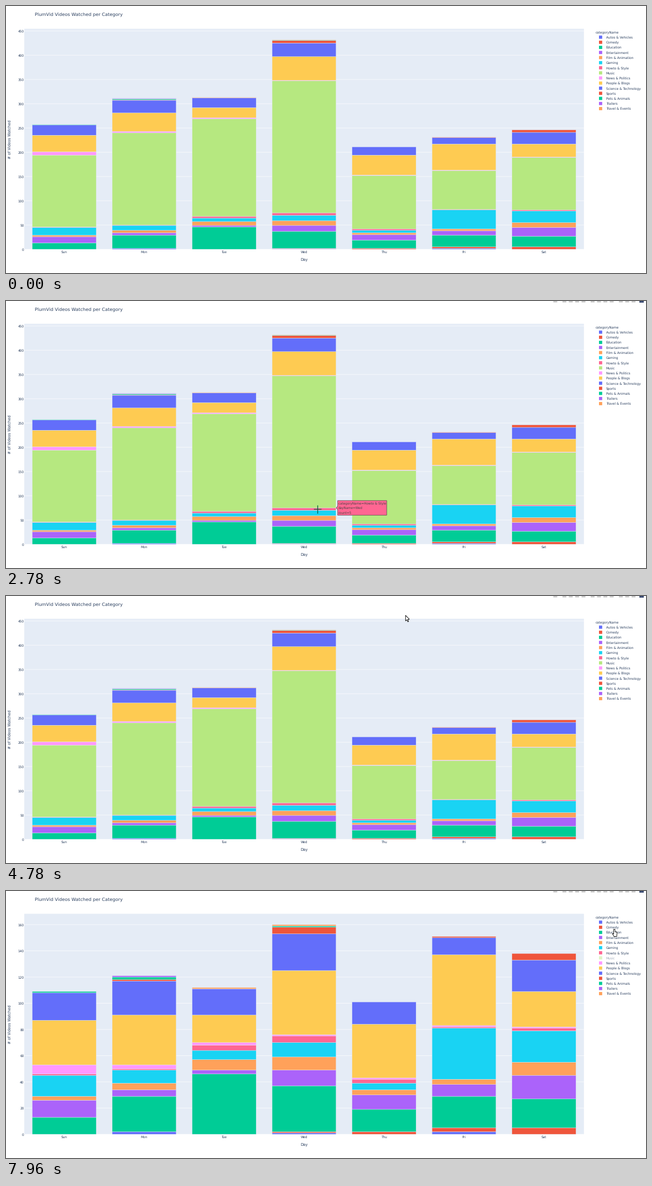
Animation, 1157 px wide and 484 px high, one loop 8 s. Source, as a matplotlib script:

```python
from math import cos

import numpy as np
import matplotlib.pyplot as plt
from matplotlib.animation import FuncAnimation
from matplotlib.collections import PatchCollection
from matplotlib.colors import to_rgb
from matplotlib.patches import Polygon, Rectangle

W, H, DPI = 1157, 484, 64
LOOP_MS, STEP_MS = 8000, 40
CURSOR_MS, TOGGLE_MS = 300, 6340
LEFT, TOP, RIGHT, BOTTOM = 33, 41.3, 1044.8, 441
INK, PLOT_BG = "#2a3f5f", "#e5ecf6"

plt.rcParams["font.family"] = "DejaVu Sans"
plt.rcParams["text.hinting"] = "none"

DAYS = ["Sun", "Mon", "Tue", "Wed", "Thu", "Fri", "Sat"]
CATEGORIES = [
    "Autos & Vehicles", "Comedy", "Education", "Entertainment",
    "Film & Animation", "Gaming", "Howto & Style", "Music",
    "News & Politics", "People & Blogs", "Science & Technology",
    "Sports", "Pets & Animals", "Trailers", "Travel & Events",
]
PALETTE = ["#636efa", "#ef553b", "#00cc96", "#ab63fa", "#ffa15a",
           "#19d3f3", "#ff6692", "#b6e880", "#ff97ff", "#fecb52"]
MUSIC = CATEGORIES.index("Music")
MUSIC_COUNTS = [148, 190, 201, 272, 110, 80, 108]

# Where the large categories end in each day's stack, music left out
LEVELS = {
    "Education": [13, 29, 46, 37, 19, 29, 27],
    "Entertainment": [26, 34, 49, 49, 30, 38, 45],
    "Film & Animation": [29, 39, 57, 59, 34, 42, 55],
    "Gaming": [45, 49, 64, 70, 39, 81, 79],
    "People & Blogs": [87, 91, 91, 125, 84, 137, 109],
    "Science & Technology": [108, 117, 111, 153, 101, 150, 133],
}
# Thin slices, as rules of the day number
SLICES = {
    "Autos & Vehicles": lambda d: d % 2 * (2 - d // 2 % 2),
    "Comedy": lambda d: d * d // 7,
    "Howto & Style": lambda d: round(3 + 2 * cos(1.3 * (d - 2.9))),
    "News & Politics": lambda d: 7 // (d + 1),
    "Sports": lambda d: 5 if d in (3, 6) else d % 2,
    "Pets & Animals": lambda d: (d % 3 + 1) % 3 * (d < 4),
    "Trailers": lambda d: int(d == 1),
    "Travel & Events": lambda d: int(d in (2, 3)),
}

PITCH = (RIGHT - LEFT) / len(DAYS)
BAR = 0.8 * PITCH

# Pointer moves: start ms, end ms, destination
POINTER_START = (720, 478)
MOVES = [
    (300, 1060, (614, 462)), (1060, 1670, (567, 427)),
    (1900, 1990, (567, 420)), (2070, 2530, (564, 395)),
    (2630, 3470, (550, 185)), (3540, 4320, (567, 98)),
    (4400, 5180, (890, -33)), (5200, 5960, (1095, 119)),
    (6550, 6640, (1091, 119)), (7500, 7960, (1100, 69)),
]
ARROW = np.array([(0, 0), (0, 10.2), (2.4, 8), (4, 11.8), (5.6, 11.1),
                  (4, 7.5), (7, 7.2)])
HAND = np.array([(-1.4, 0.5), (1, 0.5), (1, 4.8), (4.8, 5.8), (4, 13.4),
                 (-0.9, 13.4), (-3.8, 8.2), (-1.4, 8.8)])

fig = plt.figure(figsize=(W / DPI, H / DPI), dpi=DPI, facecolor="white")
ax = fig.add_axes([0, 0, 1, 1])
ax.set_xlim(0, W)
ax.set_ylim(H, 0)
ax.axis("off")


def pt(px):
    return px * 72 / DPI


def label(x, y, text, px=5.8, ha="left", va="center_baseline", **kw):
    kw.setdefault("color", INK)
    return ax.text(x, y, text, fontsize=pt(px), ha=ha, va=va, **kw)


def box(x, y, w, h, color, **kw):
    return ax.add_patch(Rectangle((x, y), w, h, facecolor=color,
                                  edgecolor="none", snap=False, **kw))


def color_of(category):
    return PALETTE[category % len(PALETTE)]


def bar_left(day):
    return LEFT + day * PITCH + (PITCH - BAR) / 2


def day_counts(day):
    counts, level = [], 0
    for name in CATEGORIES:
        if name == "Music":
            counts.append(MUSIC_COUNTS[day])
            continue
        if name in SLICES:
            count = SLICES[name](day)
        else:
            count = LEVELS[name][day] - level
        counts.append(count)
        level += count
    return counts


COUNTS = [day_counts(d) for d in range(len(DAYS))]


def build_chart(top_value, tick_step, hidden=None):
    """Draw gridlines, ticks and stacked bars; return artists and y scale."""
    scale = 0.95 * 400 / top_value
    artists, rects, colors = [], [], []
    for tick in range(0, int(top_value / 0.95) + 1, tick_step):
        y = BOTTOM - tick * scale
        artists += ax.plot([LEFT, RIGHT], [y, y], color="white",
                           lw=pt(0.7), zorder=0.5, snap=False)
        artists.append(label(32.5, y + 0.2, str(tick), ha="right"))
    for d, counts in enumerate(COUNTS):
        base = 0
        for c, count in enumerate(counts):
            if count and c != hidden:
                rects.append(Rectangle((bar_left(d), BOTTOM - base * scale),
                                       BAR, -count * scale))
                colors.append(color_of(c))
                base += count
    bars = PatchCollection(rects, facecolors=colors, edgecolors=PLOT_BG,
                           linewidths=pt(0.45), zorder=1, snap=False)
    ax.add_collection(bars)
    return artists + [bars], scale


box(LEFT, TOP, RIGHT - LEFT, BOTTOM - TOP, PLOT_BG, zorder=0)
full_chart, full_scale = build_chart(432, 50)
filtered_chart, _ = build_chart(160, 20, hidden=MUSIC)

label(52, 14.3, "PlumVid Videos Watched per Category", 8.2)
label(539, 459, "Day", 6.75, ha="center")
label(7, 241.5, "# of Videos Watched", 6.75, ha="center", va="center",
      rotation=90)
for d, day in enumerate(DAYS):
    label(LEFT + (d + 0.5) * PITCH, 446, day, ha="center")

label(1066, 47, "categoryName")
legend = []
for c, name in enumerate(CATEGORIES):
    y = 56.5 + 9.25 * c
    legend.append((box(1072, y - 2.9, 5.8, 5.8, color_of(c)),
                   label(1084.7, y, name, 5.75)))

# Groups of toolbar icons, cut off by the top edge
toolbar = []
icon_x = 989.5
for group_size in (1, 4, 4, 3):
    for _ in range(group_size):
        toolbar.append(box(icon_x, 0, 7, 2.5, "0.78"))
        icon_x += 11.5
    icon_x += 5
toolbar.append(box(1145, -5, 8, 8, "#3f4f75"))

tip_box = ax.add_patch(Polygon([(0, 0)], lw=pt(0.7), zorder=4))
tip_text = label(601, 0, "", 5.6, va="center", linespacing=1.6, zorder=5)
cross = ax.plot([], [], lw=pt(1.3), zorder=6, solid_capstyle="butt")[0]
pointer = ax.add_patch(Polygon([(0, 0)], facecolor="white",
                               edgecolor="black", lw=pt(0.9), zorder=7))


def pointer_at(t):
    pos = np.array(POINTER_START, float)
    for start, end, goal in MOVES:
        u = np.clip((t - start) / (end - start), 0, 1)
        pos += (goal - pos) * u * u * (3 - 2 * u)
    return pos


def hit_test(x, y):
    """Return day, category and top edge of the bar segment under a point."""
    d = int((x - LEFT) // PITCH)
    if not 0 <= x - bar_left(d) <= BAR:
        return None
    tops = BOTTOM - np.cumsum(COUNTS[d]) * full_scale
    below = np.flatnonzero(tops <= y)
    return (d, below[0], tops[below[0]]) if len(below) else None


def show_tip(d, c, y):
    color = color_of(c)
    brightness = np.dot(to_rgb(color), (0.299, 0.587, 0.114))
    contrast = "#444444" if brightness >= 0.5 else "white"
    x = bar_left(d) + BAR
    tip_text.set_text(f"categoryName={CATEGORIES[c]}\ndayName={DAYS[d]}\n"
                      f"count={COUNTS[d][c]}")
    tip_text.set_position((x + 4.3, y + 0.3))
    tip_text.set_color(contrast)
    left, right = x + 2.9, tip_text.get_window_extent().x1 + 1
    tip_box.set_xy([(x + 0.2, y), (left, y - 3), (left, y - 13.2),
                    (right, y - 13.2), (right, y + 13.2), (left, y + 13.2),
                    (left, y + 3)])
    tip_box.set(facecolor=color, edgecolor=contrast)


def update(frame):
    t = frame * STEP_MS + STEP_MS / 2
    filtered = t >= TOGGLE_MS
    for artist in full_chart:
        artist.set_visible(not filtered)
    for artist in filtered_chart:
        artist.set_visible(filtered)
    for artist in legend[MUSIC]:
        artist.set_alpha(0.45 if filtered else 1)

    x, y = pointer_at(t)
    inside = t >= CURSOR_MS and y >= 0
    on_plot = inside and LEFT < x < RIGHT and TOP < y < BOTTOM
    for icon in toolbar:
        icon.set_visible(inside)

    hit = hit_test(x, y) if on_plot else None
    for artist in (tip_box, tip_text):
        artist.set_visible(hit is not None)
    if hit:
        show_tip(*hit)

    cross.set_visible(on_plot)
    pointer.set_visible(inside and not on_plot)
    if on_plot:
        under = to_rgb(color_of(hit[1]) if hit else PLOT_BG)
        cross.set_color(0.6 * (1 - np.array(under)))
        cross.set_data([x - 7.2, x + 7.2, np.nan, x, x],
                       [y, y, np.nan, y - 7.2, y + 7.2])
    else:
        on_legend = x > 1066 and 50 < y < 191
        pointer.set_xy((HAND if on_legend else ARROW) + (x, y))
    return []


anim = FuncAnimation(fig, update, frames=LOOP_MS // STEP_MS,
                     interval=STEP_MS, init_func=lambda: update(0),
                     repeat=True, repeat_delay=0, blit=False)
plt.show()
```
